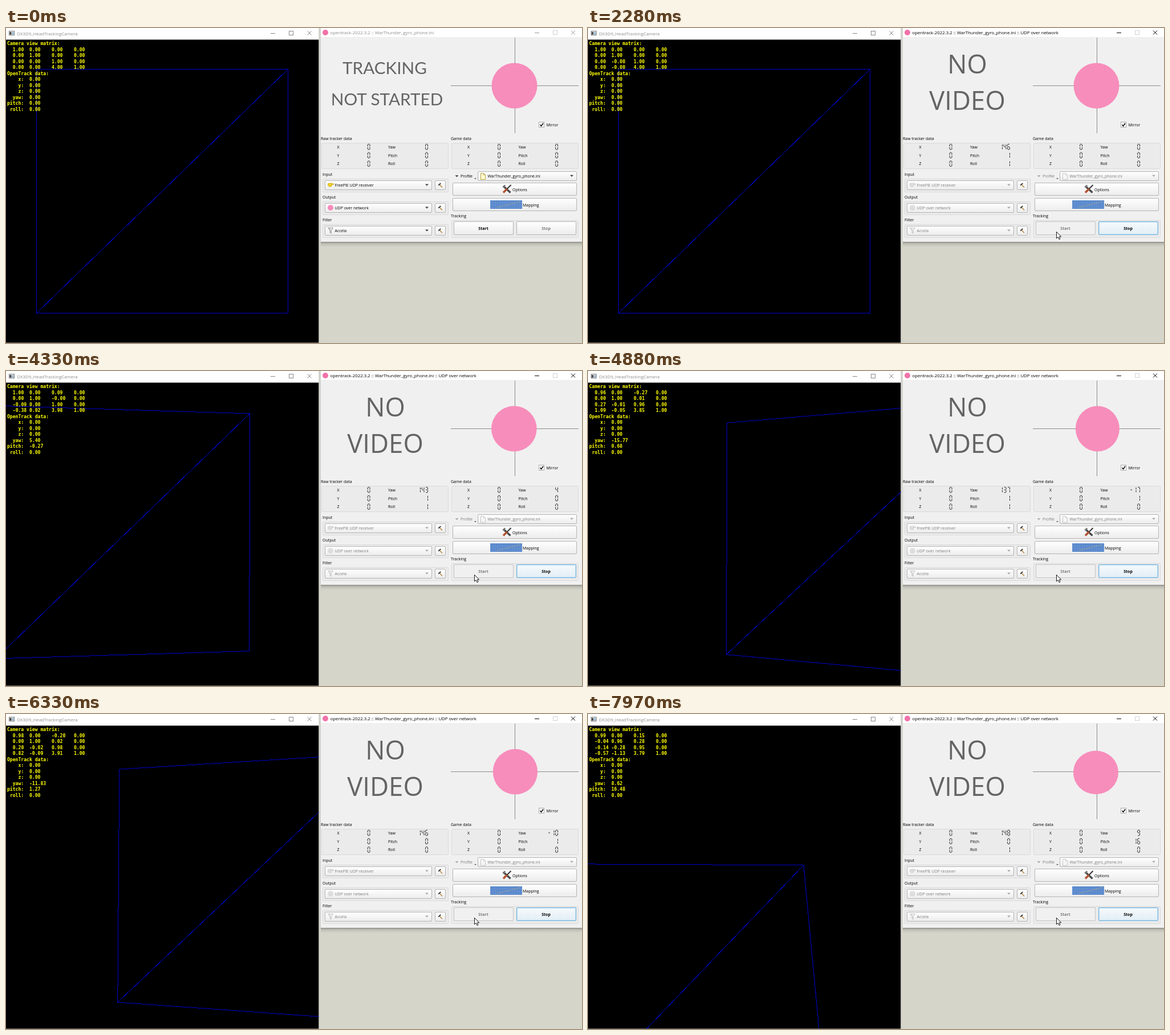
An HTML page that plays this animation: 1010 by 554 pixels, repeating every 8000 ms.

```html
<!DOCTYPE html>
<html lang="en">
<head>
<meta charset="utf-8">
<title>Head tracking camera</title>
<style>
html, body { margin: 0; width: 100%; height: 100%; overflow: hidden; background: #d5d5ca; }
svg { display: block; width: 1010px; height: 554px; }
text { font: 7px "Open Sans", "Noto Sans", sans-serif; white-space: pre; }
.title { font-size: 7.83px; }
.mono { font: bold 8.1px "DejaVu Sans Mono", monospace; fill: #ff0; }
.big { font: 29.7px Lato, sans-serif; fill: #646464; text-anchor: middle; }
.huge { font: 45.5px "Open Sans", "Noto Sans", sans-serif; }
.bold { font-weight: bold; text-anchor: middle; }
.crisp { shape-rendering: crispEdges; }
.wire { fill: none; stroke: #0000c8; shape-rendering: crispEdges; }
.lcd { fill: none; stroke: #111; stroke-width: .9; }
svg.run .idleOnly, svg:not(.run) .runOnly { display: none; }
svg.run .lock text, svg:not(.run) .stop text { fill: #7d7d7d; }
svg.run .lock .icon { filter: grayscale(1); opacity: .55; }
svg.run .lock .arrow { fill: #aaa; }
.chrome { fill: none; stroke: #999; }
svg.active .chrome { stroke: #000; }
.caption { fill: #8c8c8c; }
svg.active .caption { fill: #000; }
</style>
</head>
<body>
<svg id="stage" viewBox="0 0 1010 554">
  <defs>
    <linearGradient id="face" x2="0" y2="1">
      <stop offset="0" stop-color="#fff"/><stop offset="1" stop-color="#ececec"/>
    </linearGradient>
    <linearGradient id="focus" x2="0" y2="1">
      <stop offset="0" stop-color="#f6fafc"/><stop offset="1" stop-color="#e2eef6"/>
    </linearGradient>
    <linearGradient id="shade" x2="0" y2="1">
      <stop offset="0" stop-color="#8f8f88"/><stop offset=".4" stop-color="#bfbfb6"/><stop offset="1" stop-color="#d5d5ca"/>
    </linearGradient>
    <pattern id="grid" width="3" height="3" patternUnits="userSpaceOnUse">
      <rect width="3" height="3" fill="#4f80c8"/><path d="M0 .5H3M.5 0V3" stroke="#7ba2da" stroke-width=".6"/>
    </pattern>
    <clipPath id="view"><rect y="20.5" width="548.5" height="533"/></clipPath>
  </defs>
  <g id="fixed"></g>
  <g id="live"></g>
  <path id="cursor" d="M0 0V11.5L2.7 9.1L4.6 13.2L6.5 12.4L4.7 8.4H8.2Z" fill="#fff" stroke="#000" stroke-width=".9"/>
</svg>
<script>
const LOOP = 8000, START = 2280, STEP = 68.55;
const $ = id => document.getElementById(id);
const stage = $('stage');

// step, yaw, pitch, raw yaw, raw pitch, raw roll
const keys = [
  [0, 0, .004, 146, 1, 1],
  [11, 15, -.3, 154, 1, 1],
  [15, 16.4, -.39, 154, 1, 1],
  [18, 17, -.38, 152, 1, 1],
  [24, 13, -.33, 147, 1, 1],
  [30, 5.4, -.27, 143, 1, 1],
  [35, -9, .5, 138, 1, 1],
  [42, -23, .8, 136, 1, 0],
  [49, -29.18, 1.05, 138, 1, 0],
  [55, -23, 1.2, 142, 1, 0],
  [60, -9, 1.3, 147, 0, 0],
  [65, 3, 1.5, 150, -1, 0],
  [69, 6.1, 2.01, 150, -1, 0],
  [72, 6.9, 4.2, 149, -1, 0],
  [78, 8.2, 11.5, 148, 0, 1],
  [83, 8.62, 16.48, 148, 0, 1]
];

// Cubic through the keys, with slopes taken from the neighbours.
function pose(step) {
  const last = keys.length - 1;
  step = Math.min(step, keys[last][0]);
  let i = 0;
  while (i < last - 1 && keys[i + 1][0] <= step) i++;
  const a = keys[i], b = keys[i + 1], span = b[0] - a[0], u = (step - a[0]) / span;
  const slope = (n, c) => {
    if (n === 0 || n === last) return 0;
    const p = keys[n - 1], q = keys[n + 1];
    return (q[c] - p[c]) / (q[0] - p[0]);
  };
  return [1, 2, 3, 4, 5].map(c =>
    (1 + 2 * u) * (1 - u) ** 2 * a[c] + u * u * (3 - 2 * u) * b[c] +
    span * u * (1 - u) * ((1 - u) * slope(i, c) - u * slope(i + 1, c)));
}

const text = (x, y, s, cls = '') => `<text x="${x}" y="${y}" class="${cls}">${s}</text>`;
const path = (d, attrs) => `<path d="${d}" ${attrs}/>`;
const box = (x, y, w, h, fill, stroke = 'none', r = 0, more = '') =>
  `<rect x="${x}" y="${y}" width="${w}" height="${h}" rx="${r}" fill="${fill}" stroke="${stroke}" ${more}/>`;
const frame = (x, y, w, h) => box(x + .5, y + .5, w, h, '#ebebeb', '#dadada', 1);
const button = (x, y, w, h) => box(x + .5, y + .5, w, h, 'url(#face)', '#b4b4b4', 1.5);
const arrow = (x, y) => path(`M${x - 3} ${y - 1.5}h6l-3 3.2z`, 'class="arrow" fill="#444"');
const disc = (x, y, r) => `<circle class="icon" cx="${x}" cy="${y}" r="${r}" fill="#f78dbb"/>`;
const combo = (x, y, w, label, icon) =>
  `<g class="lock">${button(x, y, w, 16)}<g class="icon">${icon}</g>` +
  `${text(x + 17.5, y + 11, label)}${arrow(x + w - 8, y + 8)}</g>`;

function hammer(x, y) {
  return path(`M${x - 1} ${y}l5 5.5`, 'stroke="#b98a3e" stroke-width="1.5"') +
    path(`M${x - 3.5} ${y + 1}l4 -3.6l1.5 .8l-.8 1l-3.3 3z`, 'fill="#3a3a3a"');
}

function windowButtons(x, y, cls, stroke) {
  return `<g class="crisp">` +
    path(`M${x - 4} ${y + .5}h8`, `class="${cls}" ${stroke}`) +
    box(x + 28.5, y - 3.5, 7, 7, 'none', cls ? '#d2d2d2' : '#888') + '</g>' +
    path(`M${x + 60.5} ${y - 3.5}l7 7m0 -7l-7 7`, `class="${cls}" ${stroke}`);
}

function buildFixed() {
  const gray = 'stroke="#888"';
  const hand = path('M564.5 273.5l5 -.8l5 1.2v1.6h-4l1 1l-1.5 2.5h-3.5l-2 -2z', 'fill="#f2cf1d" stroke="#a88713" stroke-width=".5"');
  const funnel = path('M564.5 351.5h9l-3.3 4.5v5l-2 -1v-4z', 'fill="#f4f4f4" stroke="#777" stroke-width=".8"') +
    path('M567.5 352.5l1.5 5', 'stroke="#999"');
  const page = path('M832.5 255.5h5l3 3v8h-8z', 'fill="#fffbd0" stroke="#b59a33" stroke-width=".9"') +
    path('M837.5 255.5v3h3', 'fill="none" stroke="#b59a33" stroke-width=".8"');
  let s = box(0, 0, 548.5, 20.5, '#fff') + box(0, 20.5, 548.5, 533, '#000') +
    box(548.5, 0, 3.5, 376, '#d2d2cd') + box(548.5, 376, 1, 178, '#c6c6bd') +
    box(552, 376, 458, 9, 'url(#shade)') + box(552, 0, 458, 16.5, '#fff') + box(552, 16.5, 458, 359.5, '#f0f0f0');

  // Title bars
  s += box(5.5, 5.5, 9, 7, '#fff', '#777') + box(6.5, 7, 3, 4.5, '#333') + box(10.5, 7, 3, 4.5, '#8eb1cc') +
    `<text x="19.5" y="13" class="title" fill="#8c8c8c">DX3D9_HeadTrackingCamera</text>` +
    windowButtons(468, 9, '', gray) +
    `<circle cx="560" cy="8" r="5" fill="#f272a8"/>` +
    `<text x="568.5" y="10.7" class="title caption">opentrack-2022.3.2 :: WarThunder_gyro_phone.ini<tspan class="runOnly"> :: UDP over network</tspan></text>` +
    windowButtons(930.5, 8, 'chrome', '');

  // Preview
  s += `<g class="idleOnly">${text(664, 80.5, 'TRACKING', 'big')}${text(668, 136, 'NOT STARTED', 'big')}</g>` +
    `<g class="runOnly">${text(665, 79.5, 'NO', 'big huge')}${text(665, 143.5, 'VIDEO', 'big huge')}</g>` +
    path('M892.5 17V185M780 101.5H1004', 'class="crisp" stroke="#8b8b8b"') +
    box(934.5, 165.5, 9, 9, '#fff', '#aaa') + path('M936.5 170l2 2.5l3.5 -5', 'fill="none" stroke="#000" stroke-width="1.4"') +
    text(947.5, 173, 'Mirror');

  // Readouts
  s += text(552, 197, 'Raw tracker data') + text(780, 197, 'Game data') +
    frame(553, 202, 222, 45) + frame(781, 202, 222, 45);
  for (const x of [580.5, 809]) {
    ['X', 'Y', 'Z'].forEach((v, i) => s += text(x, 211.7 + 14.8 * i, v));
    ['Yaw', 'Pitch', 'Roll'].forEach((v, i) => s += text(x + 89.5, 211.7 + 14.8 * i, v));
  }

  // Plugin selectors
  [['Input', 'FreePIE UDP receiver', hand],
   ['Output', 'UDP over network', disc(569, 316, 5)],
   ['Filter', 'Accela', funnel]].forEach(([label, value, icon], i) => {
    const y = 260 + 40 * i;
    s += text(555, y, label) + frame(555, y + 5, 220, 23) + combo(559, y + 8, 187, value, icon) +
      button(752, y + 8, 18, 16) + hammer(761, y + 15);
  });

  // Profile, options and mapping
  s += `<g class="lock">${arrow(790.5, 260.5)}${text(797, 263, 'Profile')}</g>` + path('M821 264h4l-2 2z', 'fill="#555"') +
    combo(827, 252, 173, 'WarThunder_gyro_phone.ini', page) +
    button(783, 272, 217, 22) + button(783, 299, 217, 22) +
    path('M872 278l12.5 11.5', 'stroke="#4a4a4a" stroke-width="3.4"') +
    path('M871 279.5l3 -.8l.8 -2.7', 'fill="none" stroke="#777" stroke-width="2.4"') +
    path('M885.5 276l-7 7', 'stroke="#333" stroke-width="2"') +
    path('M878.5 283l-6.5 6.5', 'stroke="#b5512f" stroke-width="3.6"') + text(888, 286.5, 'Options') +
    box(849, 303, 56, 15, 'url(#grid)') + path('M860 316L902 305', 'stroke="#a3a396" stroke-width=".8"') +
    text(906, 314, 'Mapping');

  // Tracking controls
  s += text(780, 332.5, 'Tracking') + frame(781, 338, 222, 30) + button(785, 340, 104, 23) + button(895, 340, 104, 23) +
    `<g class="runOnly">${box(785.5, 340.5, 104, 23, '#f0f0f0', '#c4c4c4', 1.5)}` +
    `${box(895.5, 340.5, 104, 23, 'url(#focus)', '#6aaedb', 1.5)}${box(896.7, 341.7, 101.6, 20.6, 'none', '#c4e2f4', 1)}</g>` +
    `<g class="lock">${text(837, 355, 'Start', 'bold')}</g><g class="stop">${text(947, 355, 'Stop', 'bold')}</g>`;
  $('fixed').innerHTML = s;
}

const segments = ['M.7 0h2.8', 'M4 .6v3.4', 'M4 5.4v3.4', 'M.7 9.4h2.8', 'M.2 5.4v3.4', 'M.2 .6v3.4', 'M.7 4.7h2.8'];
const digits = { 0: '012345', 1: '12', 2: '01346', 3: '01236', 4: '1256', 5: '02356', 6: '023456', 7: '012', 8: '0123456', 9: '012356', '-': '6' };
function lcd(right, row, value) {
  const s = String(Math.round(value) + 0);
  return [...s].map((c, i) =>
    `<g class="lcd" transform="translate(${right - 4.5 - 6.5 * (s.length - 1 - i)} ${204.3 + 14.8 * row})">` +
    path([...digits[c]].map(n => segments[n]).join(''), '') + '</g>').join('');
}

function viewMatrix(yaw, pitch) {
  const rad = Math.PI / 180;
  const sy = Math.sin(yaw * rad), cy = Math.cos(yaw * rad), sp = Math.sin(pitch * rad), cp = Math.cos(pitch * rad);
  const z = [-sy * cp, -sp, cy * cp];
  return [[cy, 0, sy, 0], [-sp * sy, cp, sp * cy, 0], [...z, 0], [...z.map(v => 4 * v), 1]];
}

function drawLive(now, ahead, raw) {
  const [yaw, pitch] = now, m = viewMatrix(yaw, pitch), half = 4 / 3;
  const point = (sx, sy) => {
    const [x, y, z] = [0, 1, 2].map(c => half * (sx * m[0][c] + sy * m[1][c]) + m[3][c]);
    return `${(274 + 661.4 * x / z).toFixed(1)} ${(287 - 643.4 * y / z).toFixed(1)}`;
  };
  const corner = point(-1, -1), far = point(1, 1);
  let s = `<g clip-path="url(#view)">` +
    path(`M${corner}L${point(-1, 1)}L${far}L${point(1, -1)}L${corner}L${far}`, 'class="wire"') + '</g>';

  const line = (row, x, str) => s += text(x, (30.4 + 10.5 * row).toFixed(1), str, 'mono');
  line(0, 2, 'Camera view matrix:');
  m.forEach((r, i) => r.forEach((v, j) => line(i + 1, [11.8, 41, 80, 119][j], v.toFixed(2))));
  line(5, 2, 'OpenTrack data:');
  ['x', 'y', 'z', 'yaw', 'pitch', 'roll'].forEach((name, i) => {
    line(6 + i, 2 + 4.88 * (5 - name.length), name + ':');
    line(6 + i, 41, [0, 0, 0, yaw, pitch, 0][i].toFixed(2));
  });

  s += `<ellipse cx="${891.5 - 7 * m[0][2]}" cy="${101.5 - 5 * m[2][1]}" rx="${40 * m[0][0]}" ry="${40 * m[1][1]}" fill="#f78dbb"/>`;
  for (let row = 0; row < 3; row++)
    s += lcd(638.5, row, 0) + lcd(740, row, raw[row]) + lcd(867, row, 0) + lcd(968, row, [...ahead.slice(0, 2), 0][row]);
  $('live').innerHTML = s;
}

function moveCursor(t) {
  const hold = (from, step, count) => Math.max(0, Math.min(1, Math.floor((t - from) / step) / count));
  const ease = u => 1 - (1 - u) ** 2;
  const a = ease(hold(500, 70, 5)), b = hold(935, 65, 5);
  $('cursor').setAttribute('transform', `translate(${938 - 130 * a + 13.5 * b} ${502 - 156 * a + 12.5 * b})`);
  $('cursor').style.display = t < 500 ? 'none' : '';
}

let shown;
function render(time) {
  const t = time % LOOP;
  const step = Math.floor((t - START) / STEP + .2);
  const tracking = t >= START, linked = t >= 1600;
  stage.classList.toggle('active', t >= 1460);
  stage.classList.toggle('run', t >= 1530);
  moveCursor(t);
  const state = tracking ? Math.max(0, step) : linked ? -1 : -2;
  if (state !== shown) {
    shown = state;
    const rest = [0, 0, 0, 0, 0];
    const now = state >= 0 ? pose(state) : linked ? pose(0) : rest;
    drawLive(now, state > 0 ? pose(state + .6) : now, now.slice(2));
  }
  requestAnimationFrame(() => render(performance.now() - origin));
}

buildFixed();
const origin = performance.now();
render(0);
</script>
</body>
</html>
```
